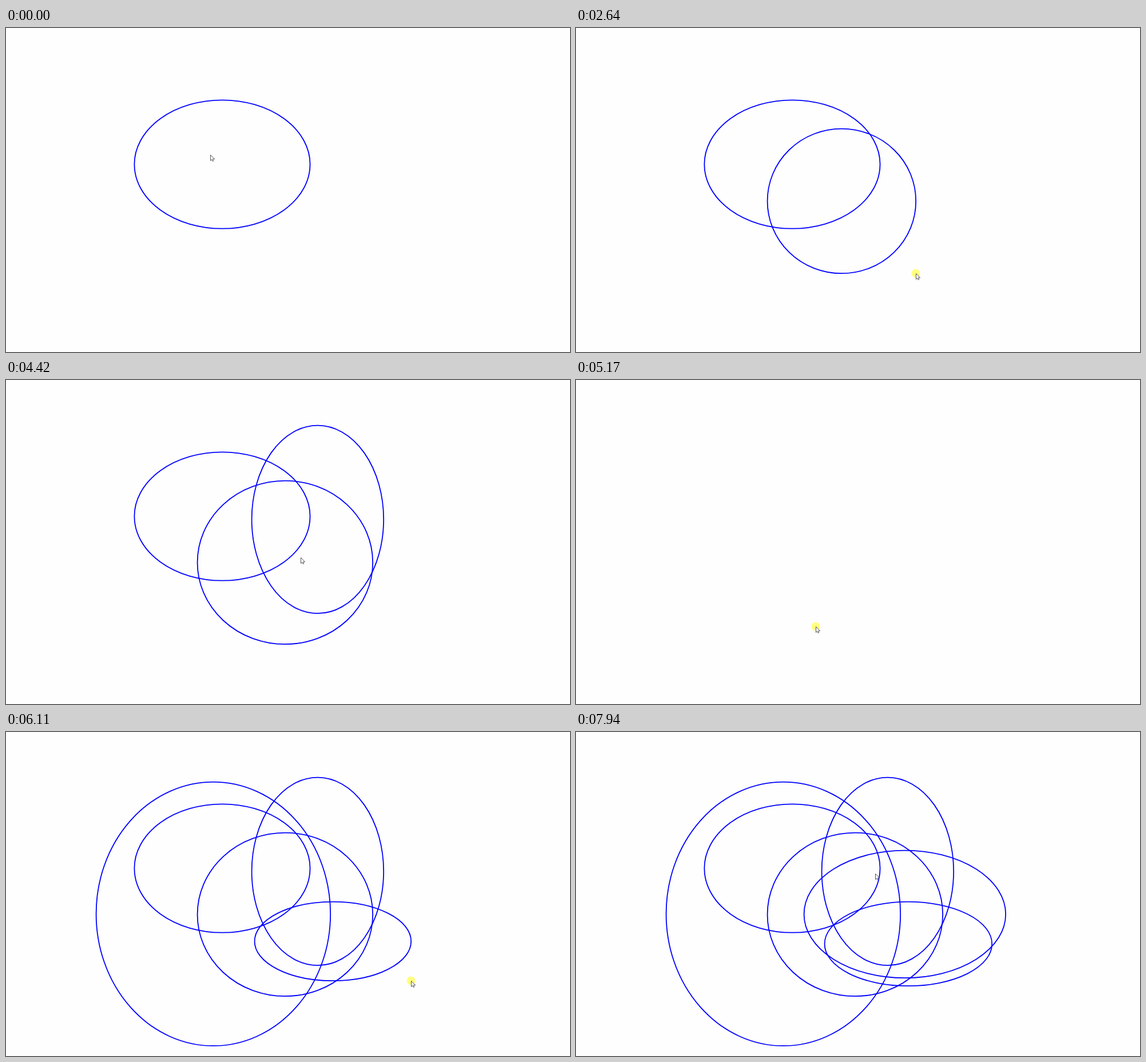
Animation, 986 px wide and 568 px high, one loop 8000 ms. Source, as an HTML page:

```html
<!DOCTYPE html>
<html lang="en">
<head>
<meta charset="utf-8">
<title>Drawing ellipses</title>
<style>
  html, body { margin: 0; width: 100%; height: 100%; overflow: hidden; background: #fefefe; }
  svg { display: block; width: 986px; height: 568px; }
  #shapes { fill: none; stroke: #00f; stroke-width: 1.8; }
  #press { fill: #ffff80; }
  #arrow { fill: #fff; stroke: #444; stroke-width: .9; }
</style>
</head>
<body>
<svg viewBox="0 0 986 568">
  <circle id="press" r="7.5"/>
  <g id="shapes"><ellipse cx="378" cy="239" rx="153.6" ry="112.7"/></g>
  <path id="arrow" d="M.5 .5V10.6L2.8 8.5L4.2 11.6L5.8 10.9L4.4 7.8H7.6Z"/>
</svg>
<script>
const LOOP = 8000, HOLD = 140;
const $ = id => document.getElementById(id);
const shapes = $('shapes'), press = $('press'), arrow = $('arrow');
const legs = [];
let home = { x: 357, y: 222 };

// Each leg continues where the previous one stopped; bow bends it sideways.
function move(start, end, x, y, bow = 0) {
  const from = legs.at(-1)?.to ?? home;
  const leg = { start, end, from, to: { x, y }, bow };
  legs.push(leg);
  return leg;
}

function draw(...args) {
  const el = document.createElementNS('http://www.w3.org/2000/svg', 'ellipse');
  move(...args).shape = shapes.appendChild(el);
}

move(1210, 1430, 334, 176);
draw(1615, 2950, 641, 463, .045);
move(3090, 3480, 429, 79);
draw(3600, 4150, 660, 409);
move(4215, 4790, 157, 87, .01);
draw(4790, 5390, 567, 550, .065);
move(5640, 5800, 434, 297);
draw(5840, 6160, 727, 445);
move(6300, 6490, 398, 207);
draw(6540, 6910, 751, 431);
move(7350, 7940, 523, 248);

const smooth = k => k * k * (3 - 2 * k);

function along({ start, end, from, to, bow }, t) {
  const k = smooth(Math.min(1, (t - start) / (end - start)));
  const dx = to.x - from.x, dy = to.y - from.y;
  const side = bow * Math.sin(Math.PI * k);
  return {
    x: Math.round(from.x + dx * k - dy * side),
    y: Math.round(from.y + dy * k + dx * side)
  };
}

function set(el, attrs) {
  for (const name in attrs) el.setAttribute(name, attrs[name]);
}

const show = (el, on) => set(el, { visibility: on ? 'inherit' : 'hidden' });

// Stretch an ellipse between the pressed point and the pointer.
function stretch(el, a, b) {
  const l = a.x + .6, t = a.y + .6, r = b.x + .2, m = b.y + .2;
  set(el, {
    cx: (l + r) / 2, cy: (t + m) / 2,
    rx: Math.max(0, (r - l) / 2), ry: Math.max(0, (m - t) / 2)
  });
}

function render(t) {
  const leg = legs.findLast(l => l.start <= t);
  const { x, y } = leg ? along(leg, t) : home;
  set(arrow, { transform: `translate(${x} ${y})` });
  set(press, { cx: x, cy: y });
  show(press, leg?.shape && t < leg.end + HOLD);

  for (const l of legs) {
    if (!l.shape) continue;
    show(l.shape, t >= l.start);
    if (t >= l.start) stretch(l.shape, l.from, along(l, t));
  }

  // Repainting during a drag clears the canvas for a moment.
  const phase = t % 290;
  show(shapes, !(leg?.shape && t < leg.end && phase >= 240 && phase < 280));
}

const origin = performance.now();
function tick() {
  render((performance.now() - origin) % LOOP);
  requestAnimationFrame(tick);
}
render(0);
requestAnimationFrame(tick);
</script>
</body>
</html>
```
